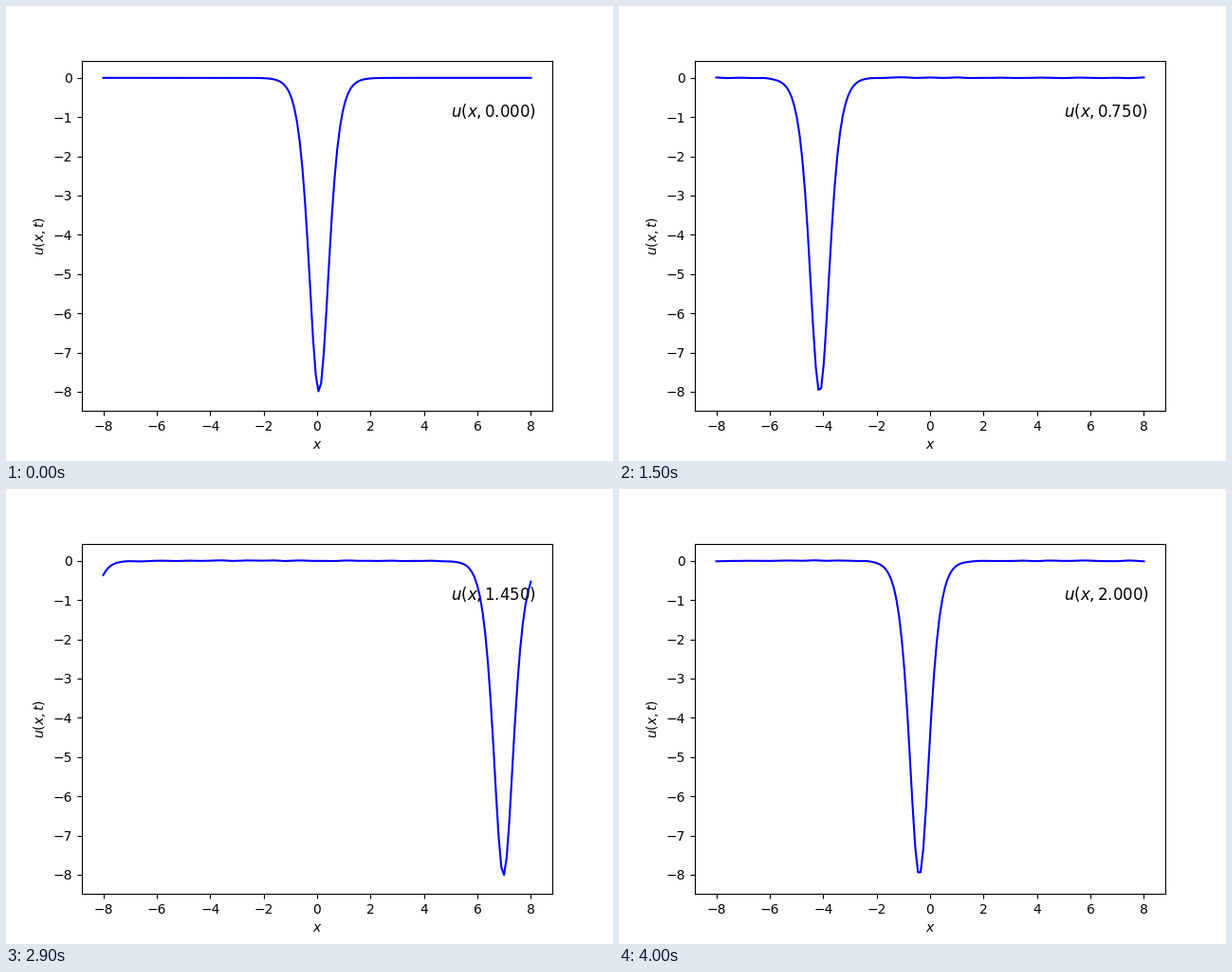
A matplotlib script for the animation above (4.1 s loop, 640 by 480 pixels).

```python
import numpy as np
import matplotlib.pyplot as plt
from matplotlib.animation import FuncAnimation

# Soliton of u_t - 6 u u_x + u_xxx = 0 on a periodic grid
N = 160
FRAMES = 41
FRAME_DT = 0.05
SUBSTEPS = 100
START = 0.068

x = np.linspace(-8, 8, N)
h = x[1] - x[0]


def rate(u):
    """Centred differences with a three-point mean in the advection term."""
    p = np.concatenate((u[-2:], u, u[:2]))
    left, right = p[1:-3], p[3:-1]
    advection = (left + u + right) * (right - left) / h
    dispersion = (p[4:] - 2 * right + 2 * left - p[:-4]) / (2 * h**3)
    return advection - dispersion


def step(u, dt):
    k1 = rate(u)
    k2 = rate(u + dt / 2 * k1)
    k3 = rate(u + dt / 2 * k2)
    k4 = rate(u + dt * k3)
    return u + dt / 6 * (k1 + 2 * k2 + 2 * k3 + k4)


def solve():
    u = -8 / np.cosh(2 * (x - START))**2
    states = [u]
    for _ in range(FRAMES - 1):
        for _ in range(SUBSTEPS):
            u = step(u, FRAME_DT / SUBSTEPS)
        states.append(u)
    return states


states = solve()

fig, ax = plt.subplots(figsize=(6.4, 4.8), dpi=100)
ax.set_xlim(-8.8, 8.8)
ax.set_ylim(-8.49, 0.44)
ax.set_xlabel("$x$")
ax.set_ylabel("$u(x,t)$")
line, = ax.plot(x, states[0], "b", lw=1.5)
label = ax.text(5, -1, "", fontsize=12)


def update(i):
    line.set_ydata(states[i])
    label.set_text(f"$u(x,{i * FRAME_DT:.3f})$")
    return line, label


anim = FuncAnimation(fig, update, frames=FRAMES, interval=100, repeat=True)
plt.show()
```
